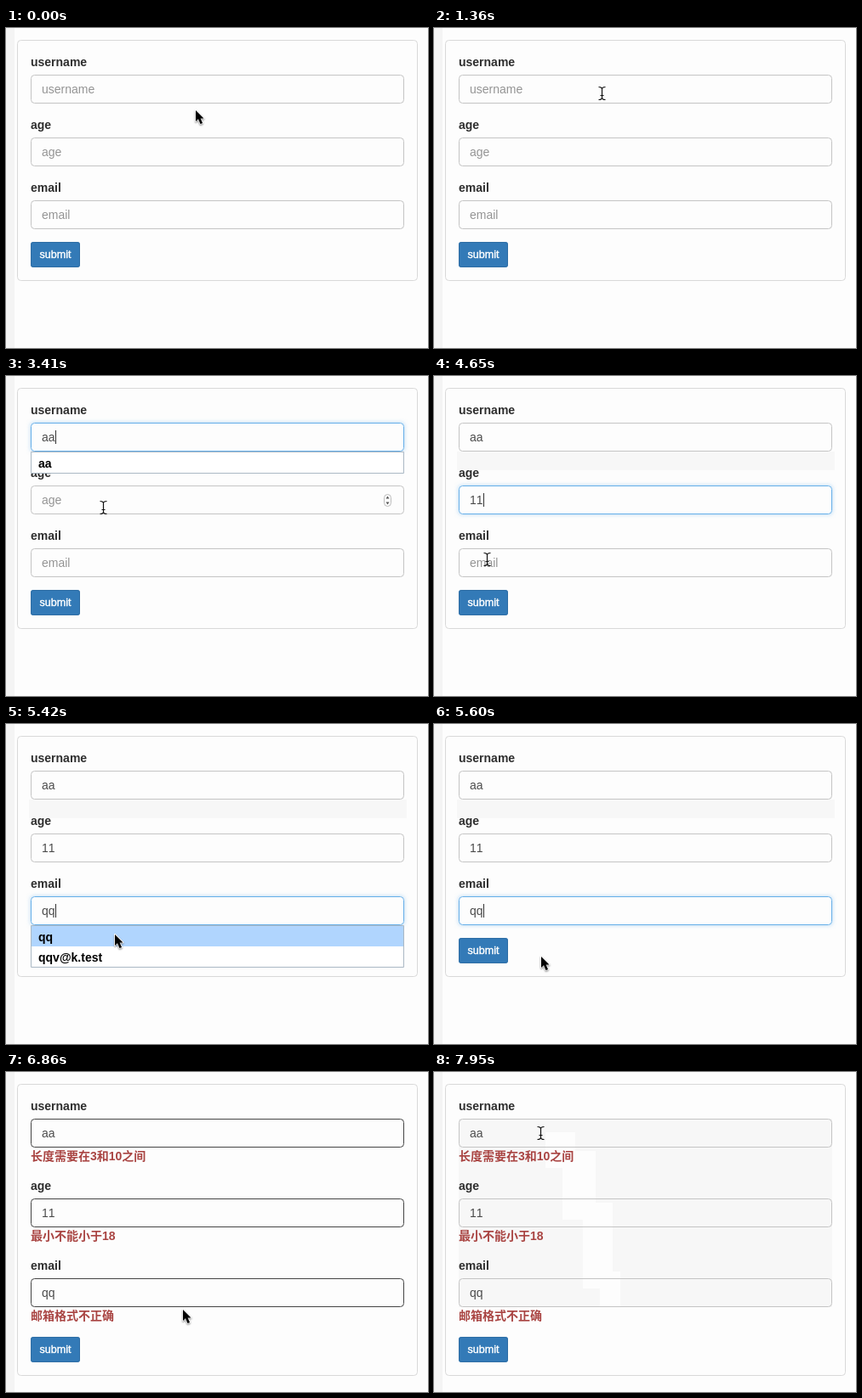
An HTML page with a canvas for the animation above (8000 ms loop, 496x377 px).

```html
<!DOCTYPE html>
<html lang="zh-CN">
<head>
<meta charset="utf-8">
<title>Form validation</title>
<style>
  html, body { margin: 0; width: 100%; height: 100%; overflow: hidden; background: #fdfdfd; }
  canvas { display: block; }
</style>
</head>
<body>
<canvas id="stage" width="496" height="377"></canvas>
<script>
const ctx = document.getElementById('stage').getContext('2d');
const LOOP = 8000;
const SUBMITTED = 6500;
const DIMMED = 7020;
const LEFT = 29, WIDTH = 439, HEIGHT = 34;
const PAPER = '#fdfdfd';
const GHOST = '#f7f7f7';
const FAMILY = '"Liberation Sans", "Noto Sans CJK SC", "Noto Sans CJK", sans-serif';

const fields = [
  { label: 'username', value: 'aa', typing: 2760, pace: 160, focus: 1760, blur: 3560,
    suggestions: ['aa', 'abc'], menuEnd: 3560, error: '长度需要在3和10之间' },
  { label: 'age', value: '11', typing: 4170, pace: 180, focus: 3560, blur: 4760,
    suggestions: [], menuEnd: 0, error: '最小不能小于18' },
  { label: 'email', value: 'qq', typing: 5240, pace: 60, focus: 4760, blur: 5760,
    suggestions: ['qq', 'qqv@k.test'], menuEnd: 5500, error: '邮箱格式不正确' }
];

const glide = (start, end, to, via) => ({ start, end, to, via });
const HOME = { x: 222, y: 96 };
const glides = [
  glide(900, 1020, { x: 217, y: 79 }),
  glide(1190, 1680, { x: 146, y: 72 }),
  glide(3290, 3410, { x: 114, y: 155 }),
  glide(3410, 3520, { x: 61, y: 146 }),
  glide(4350, 4700, { x: 62, y: 220 }),
  glide(5320, 5420, { x: 127, y: 247 }),
  glide(5500, 6020, { x: 86, y: 281 }, { x: 120, y: 390 }),
  glide(6080, 6320, { x: 66, y: 269 }),
  glide(6540, 6840, { x: 207, y: 279 }),
  glide(7500, 7950, { x: 125, y: 72 }, { x: 166, y: 66 })
];

const clamp = v => Math.max(0, Math.min(1, v));
const ramp = (t, start, length) => clamp((t - start) / length);
const smooth = k => k * k * (3 - 2 * k);
const lerp = (a, b, k) => a + (b - a) * k;
const mix = (a, b, k) => `rgb(${a.map((v, i) => Math.round(lerp(v, b[i], k)))})`;

const shift = (i, t) => t >= SUBMITTED ? 20 * i : 0;
const fieldTop = (i, t) => 55 + 74 * i + shift(i, t);
const buttonTop = t => 252 + shift(3, t);
const isOver = (p, x, y, w, h) => p.x >= x && p.x < x + w && p.y >= y && p.y < y + h;

function pointerAt(t) {
  const i = glides.findLastIndex(g => t >= g.start);
  if (i < 0) return HOME;
  const { start, end, to, via } = glides[i];
  const from = i ? glides[i - 1].to : HOME;
  const k = smooth(ramp(t, start, end - start));
  const along = axis => Math.round(via
    ? lerp(lerp(from[axis], via[axis], k), lerp(via[axis], to[axis], k), k)
    : lerp(from[axis], to[axis], k));
  return { x: along('x'), y: along('y') };
}

function typedAt(field, t) {
  const count = Math.floor((t - field.typing) / field.pace) + 1;
  return field.value.slice(0, Math.max(0, count));
}

function menuAt(field, t) {
  if (t < field.typing + 60 || t >= field.menuEnd) return [];
  return field.suggestions.filter(s => s.startsWith(typedAt(field, t)));
}

function rect(x, y, w, h, color) {
  ctx.fillStyle = color;
  ctx.fillRect(x, y, w, h);
}

function fillRound(x, y, w, h, r, color) {
  ctx.beginPath();
  ctx.roundRect(x, y, w, h, r);
  ctx.fillStyle = color;
  ctx.fill();
}

function outline(x, y, w, h, r, color) {
  ctx.beginPath();
  ctx.roundRect(x + 0.5, y + 0.5, w - 1, h - 1, r);
  ctx.strokeStyle = color;
  ctx.lineWidth = 1;
  ctx.stroke();
}

function text(str, x, y, color, weight = 'normal', size = 14) {
  ctx.font = `${weight} ${size}px ${FAMILY}`;
  ctx.fontKerning = 'none';
  ctx.fillStyle = color;
  ctx.fillText(str, x, y);
}

function drawField(field, i, t, pointer) {
  const y = fieldTop(i, t);
  const value = typedAt(field, t);
  const glow = ramp(t, field.focus, 150) * (1 - ramp(t, field.blur, 150));
  const invalid = t >= SUBMITTED && t < DIMMED;

  text(field.label, LEFT, y - 10, '#2e2e2e', 'bold');
  if (glow > 0) {
    ctx.save();
    ctx.shadowColor = `rgba(102,175,233,${0.5 * glow})`;
    ctx.shadowBlur = 5;
    fillRound(LEFT, y, WIDTH, HEIGHT, 4, PAPER);
    ctx.restore();
  }
  outline(LEFT, y, WIDTH, HEIGHT, 4, invalid ? '#444' : mix([196, 196, 196], [102, 175, 233], glow));
  text(value || field.label, 42, y + 22, value ? '#4a4a4a' : '#949494');

  const focused = t >= field.focus && t < field.blur;
  const typing = value && t < field.typing + 700;
  if (focused && (typing || (t - field.focus) % 1060 < 530)) {
    const caret = value ? ctx.measureText(value).width + 1 : 0;
    rect(42 + Math.floor(caret), y + 9, 1, 16, '#333');
  }
  if (field.label === 'age' && isOver(pointer, LEFT, y, WIDTH, HEIGHT)) drawSpinner(y);
  if (t >= SUBMITTED) text(field.error, LEFT, y + 49, '#a94442', 'bold');
}

function drawSpinner(y) {
  outline(444, y + 10, 9, 15, 4, '#bbb');
  ctx.fillStyle = '#555';
  for (const dir of [-1, 1]) {
    const base = y + 17.5 + dir * 2;
    polygon([446.5, base, 450.5, base, 448.5, base + dir * 3]);
    ctx.fill();
  }
}

function drawMenu(field, i, t, pointer) {
  const items = menuAt(field, t);
  if (!items.length) return;
  const y = fieldTop(i, t) + HEIGHT;
  const h = 2 + items.length * 24;
  rect(LEFT, y, WIDTH, h, '#fff');
  items.forEach((item, row) => {
    const top = y + row * 24;
    if (isOver(pointer, LEFT, top, WIDTH, 24)) rect(LEFT + 1, top, WIDTH - 2, 25, '#b0d5fe');
    text(item, 38, top + 19, '#000', 'bold');
  });
  outline(LEFT, y, WIDTH, h, 0, '#aab8c4');
}

function drawButton(t, pointer) {
  const y = buttonTop(t);
  const hover = isOver(pointer, LEFT, y, 57, 30);
  fillRound(LEFT, y, 58, 30, 3, hover ? '#286090' : '#337ab7');
  outline(LEFT, y, 58, 30, 3, hover ? '#204d74' : '#2e6da4');
  ctx.textAlign = 'center';
  text('submit', 58, y + 19, '#fff', 'normal', 12.5);
  ctx.strokeStyle = '#fff';
  ctx.lineWidth = 0.4;
  ctx.strokeText('submit', 58, y + 19);
  ctx.textAlign = 'left';
}

function polygon(coords) {
  ctx.beginPath();
  for (let i = 0; i < coords.length; i += 2) ctx.lineTo(coords[i], coords[i + 1]);
  ctx.closePath();
}

function outlinedShape(fill, edge, width) {
  ctx.lineJoin = 'round';
  ctx.strokeStyle = edge;
  ctx.lineWidth = width;
  ctx.stroke();
  ctx.fillStyle = fill;
  ctx.fill();
}

function drawArrow() {
  polygon([1, 1, 1, 14, 4, 11, 6.5, 17, 9, 16, 6.5, 10.5, 10.5, 10.5]);
  ctx.shadowColor = 'rgba(0,0,0,0.35)';
  ctx.shadowBlur = 2;
  ctx.shadowOffsetY = 1;
  outlinedShape('#000', '#fff', 2);
}

function drawHand() {
  polygon([-1, 0, 1, 0, 1, 6, 8, 8, 6, 16, -1, 16, -5, 9, -1, 10]);
  outlinedShape('#fff', '#000', 2);
}

function drawBeam() {
  ctx.beginPath();
  for (const s of [-1, 1]) {
    ctx.moveTo(-3.5, s * 7.5);
    ctx.quadraticCurveTo(0.5, s * 7.5, 0.5, s * 5);
    ctx.quadraticCurveTo(0.5, s * 7.5, 4.5, s * 7.5);
  }
  ctx.moveTo(0.5, -6);
  ctx.lineTo(0.5, 6);
  ctx.moveTo(-1.5, 2.5);
  ctx.lineTo(2.5, 2.5);
  ctx.strokeStyle = '#111';
  ctx.lineWidth = 1.2;
  ctx.stroke();
}

// Typing hides the pointer until it moves again.
function isPointerHidden(t) {
  const moved = glides.findLast(g => t >= g.start)?.start ?? 0;
  return fields.some(f => t >= f.typing && f.typing > moved);
}

function drawPointer(t, p) {
  if (isPointerHidden(t)) return;
  const overField = fields.some((f, i) => isOver(p, LEFT, fieldTop(i, t), WIDTH, HEIGHT));
  const overButton = isOver(p, LEFT, buttonTop(t), 57, 30);
  ctx.save();
  ctx.translate(p.x, p.y);
  if (overField) drawBeam();
  else if (overButton) drawHand();
  else drawArrow();
  ctx.restore();
}

// Grey shades left on the page; the last glide wipes blocks of them away.
function drawGhosts(t) {
  if (t >= fields[0].blur && t < SUBMITTED) rect(27, 89, 444, 22, GHOST);
  if (t < DIMMED) return;
  rect(LEFT, 55, WIDTH, 222, GHOST);
  const { start, end } = glides.at(-1);
  const step = (end - start) / 5;
  for (let at = start + step; at <= t && at < end; at += step) {
    const a = pointerAt(at - step);
    const b = pointerAt(at);
    rect(b.x - 3, b.y - 2, a.x - b.x + 15, a.y - b.y + 20, PAPER);
  }
}

function draw(t) {
  const pointer = pointerAt(t);
  rect(0, 0, 496, 377, PAPER);
  rect(0, 0, 10, 377, '#f4f4f4');
  outline(13, 14, 471, 284 + shift(3, t), 4, '#d9d9d9');
  drawGhosts(t);
  fields.forEach((field, i) => drawField(field, i, t, pointer));
  drawButton(t, pointer);
  fields.forEach((field, i) => drawMenu(field, i, t, pointer));
  drawPointer(t, pointer);
}

const began = performance.now();
function tick() {
  draw((performance.now() - began) % LOOP);
  requestAnimationFrame(tick);
}
tick();
</script>
</body>
</html>
```
